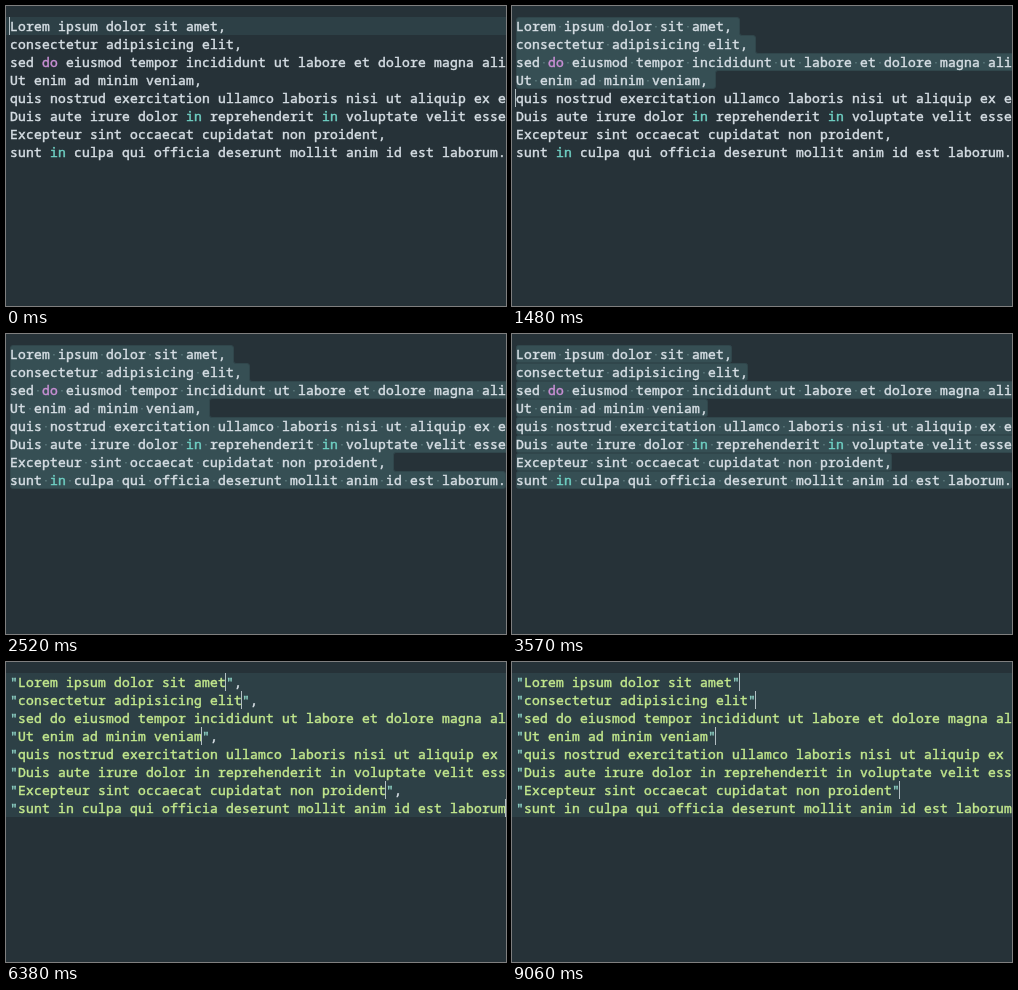
Recreate the animation shown at these times as an HTML page. Size 500 px wide and 300 px high, loop 9160 ms.

```html
<!DOCTYPE html>
<html lang="en">
<head>
<meta charset="utf-8">
<title>Multiple carets</title>
<style>
  html, body { margin: 0; width: 100%; height: 100%; overflow: hidden; background: #263238; }
  svg { display: block; width: 500px; height: 300px; }
  text {
    font: 500 13px "Noto Sans Mono", "DejaVu Sans Mono", monospace;
    letter-spacing: .2px;
    white-space: pre;
    color: #d6dee4;
  }
  text, tspan { fill: currentColor; stroke: currentColor; stroke-width: .45px; }
  .do { color: #c88fd4; }
  .in { color: #6fcfc3; }
  .str { color: #c3e88d; }
  .quote { color: #8fd3c6; }
  .line { fill: #2d4046; }
  .sel { fill: #364f54; stroke: #30464b; }
  .dot { fill: #5d7b7e; }
  .caret { fill: #b3bfc3; }
</style>
</head>
<body>
<svg id="stage" viewBox="0 0 500 300"></svg>
<script>
const LOOP = 9160, TOP = 11, ROW = 18, LEFT = 4, COL = 8;
const lines = [
  'Lorem ipsum dolor sit amet,',
  'consectetur adipisicing elit,',
  'sed do eiusmod tempor incididunt ut labore et dolore magna aliqua.',
  'Ut enim ad minim veniam,',
  'quis nostrud exercitation ullamco laboris nisi ut aliquip ex ea commodo consequat.',
  'Duis aute irure dolor in reprehenderit in voluptate velit esse cillum dolore eu fugiat nulla pariatur.',
  'Excepteur sint occaecat cupidatat non proident,',
  'sunt in culpa qui officia deserunt mollit anim id est laborum.'
];
const last = lines.length - 1;
const stage = document.getElementById('stage');

const x = col => LEFT + col * COL;
const y = row => TOP + row * ROW;
const rect = (cls, left, top, w, h, r = 0) =>
  `<rect class="${cls}" x="${left}" y="${top}" width="${w}" height="${h}" rx="${r}"/>`;
const span = (cls, s) => `<tspan class="${cls}">${s}</tspan>`;
const each = f => lines.map((s, row) => f(s.length, row)).join('');

const lineBar = row => rect('line', 0, y(row), 500, ROW);
const caret = (row, col) => rect('caret', x(col) - 1, y(row), 1, ROW);
const carets = shift => each((n, row) => caret(row, n + shift));
const allBars = () => each((n, row) => lineBar(row));

// Rounds every corner of a polygon, inner ones too
function roundPath(points, r) {
  const pts = points.filter((p, i) => !i || p[0] !== points[i - 1][0] || p[1] !== points[i - 1][1]);
  const toward = (a, b) => {
    const k = r / Math.hypot(b[0] - a[0], b[1] - a[1]);
    return `${a[0] + (b[0] - a[0]) * k} ${a[1] + (b[1] - a[1]) * k}`;
  };
  return pts.map((p, i) => {
    const prev = pts[(i + pts.length - 1) % pts.length], next = pts[(i + 1) % pts.length];
    return `${i ? 'L' : 'M'}${toward(p, prev)}Q${p[0]} ${p[1]} ${toward(p, next)}`;
  }).join('') + 'Z';
}

// One block over the first rows, line breaks included
function block(rows) {
  const edge = i => {
    const shorter = i > 0 && i < rows && lines[i].length > lines[i - 1].length;
    return y(i) + (i === 0 || shorter ? .5 : -.5);
  };
  const pts = [[LEFT + .5, edge(0)]];
  for (let i = 0; i < rows; i++) {
    const right = Math.min(520, x(lines[i].length + (i < last ? 1 : 0))) - .5;
    pts.push([right, edge(i)], [right, edge(i + 1)]);
  }
  pts.push([LEFT + .5, edge(rows)]);
  return `<path class="sel" d="${roundPath(pts, 2.5)}"/>`;
}

const bars = (from, trim) => each((n, row) =>
  rect('sel', x(from) + .5, y(row) + .5, (n - trim - from) * COL - 1, ROW - 1, 2));

const dots = (rows, shift = 0) => lines.slice(0, rows).map((s, row) =>
  [...s].map((c, i) => c === ' ' ? rect('dot', x(i + shift) + 3.2, y(row) + 9, 1.5, 1.5) : '').join('')
).join('');

const plainText = s => s.replace(/\b(do|in)\b/g, w => span(w, w));
const quotedText = comma => s => {
  const q = span('quote', '"');
  return q + span('str', s.slice(0, -1)) + q + (comma ? s.slice(-1) : '');
};
const page = format => lines.map((s, row) =>
  `<text x="${LEFT + .1}" y="${y(row) + 14}">${format(s)}</text>`).join('');

const plain = page(plainText);
const quoted = page(quotedText(true));
const bare = page(quotedText(false));

// Each scene: layer under the text, text, carets
const scenes = {
  home: [lineBar(0), plain, caret(0, 0)],
  split: [bars(0, 0) + dots(8), plain, carets(0)],
  ends: [allBars(), plain, carets(0)],
  before: [allBars(), plain, carets(-1)],
  back: [bars(0, 1) + dots(8), plain, each((n, row) => caret(row, 0))],
  wrapped: [bars(1, 0) + dots(8, 1), quoted, carets(0)],
  inside: [allBars(), quoted, carets(0)],
  after: [allBars(), quoted, carets(2)],
  cut: [allBars(), bare, carets(1)]
};
for (let n = 1; n <= lines.length; n++) {
  const end = n > last ? caret(last, lines[last].length) : caret(n, 0);
  scenes['down' + n] = [block(n) + dots(n), plain, end];
}

// Start time, scene, caret opacity
const steps = [
  [0, 'home', 1], [150, 'home', .5], [300, 'home', 0], [590, 'home', .5],
  [740, 'down1', 1], [1040, 'down2', 1], [1190, 'down3', 1], [1340, 'down4', 1],
  [1490, 'down5', 1], [1630, 'down6', 1], [1780, 'down7', 1], [1930, 'down8', 1],
  [2370, 'down8', .5], [2520, 'down8', 0], [2970, 'down8', .5],
  [3120, 'split', 1], [3420, 'split', .5], [3570, 'split', 0], [4010, 'split', .5], [4160, 'split', 1],
  [4450, 'ends', 1], [4600, 'before', 1], [4890, 'back', 1],
  [5340, 'wrapped', 1], [5640, 'wrapped', .5], [5790, 'wrapped', 0],
  [6380, 'inside', 1], [6530, 'after', 1],
  [6980, 'cut', 1], [7430, 'cut', 0], [8030, 'cut', .5], [8180, 'cut', 1],
  [8330, 'cut', .5], [8480, 'cut', 0], [8920, 'cut', .5], [9060, 'cut', 1]
];

let shown;
function draw(time) {
  const t = time % LOOP;
  const step = steps.findLast(s => s[0] <= t);
  if (step !== shown) {
    shown = step;
    const [under, text, marks] = scenes[step[1]];
    stage.innerHTML = `${under}${text}<g opacity="${step[2]}">${marks}</g>`;
  }
}

const start = performance.now();
function tick() {
  draw(performance.now() - start);
  requestAnimationFrame(tick);
}
tick();
</script>
</body>
</html>
```
